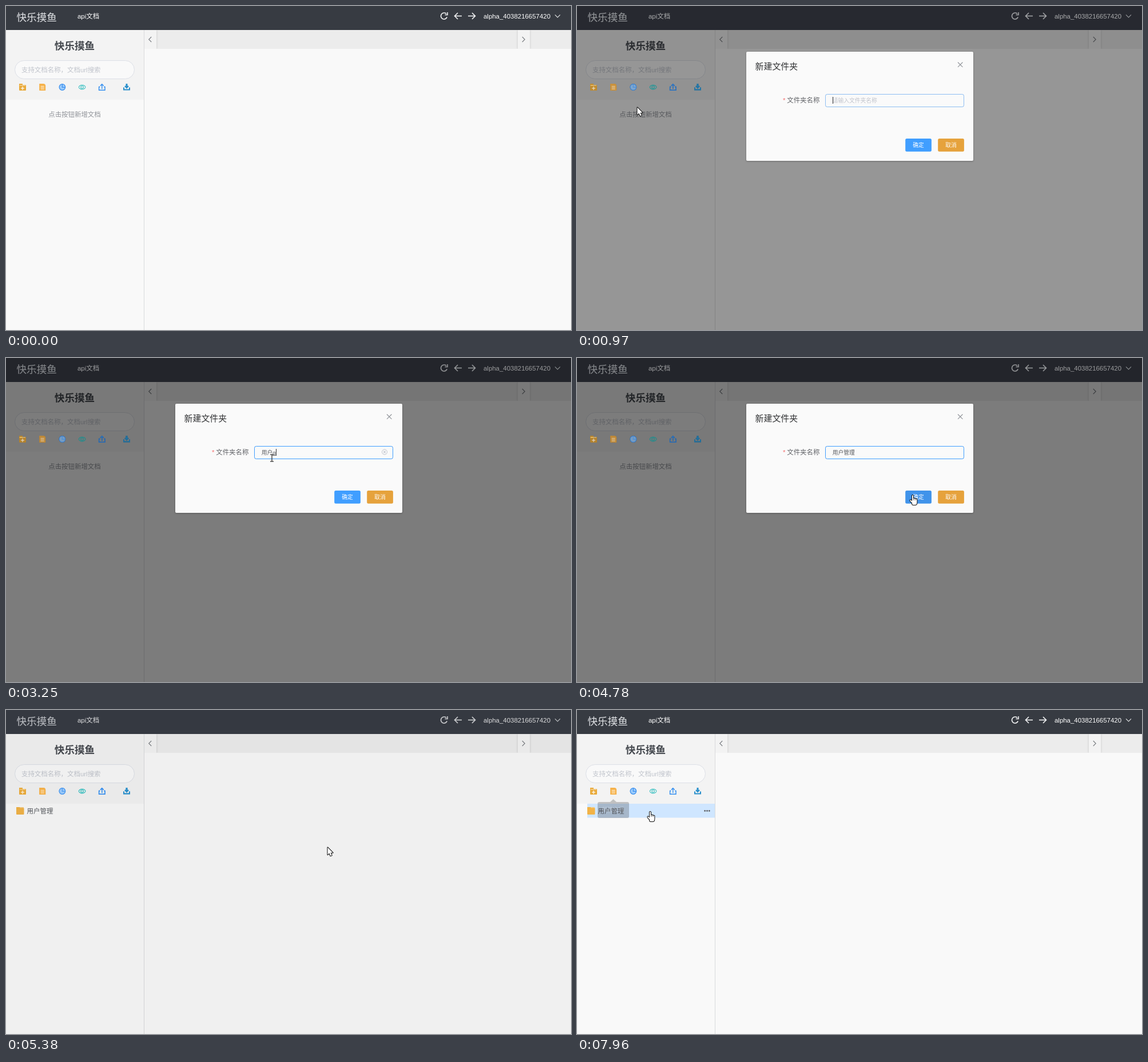
An HTML page with a canvas that plays this animation: 988 by 567 pixels, repeating every 7990 ms.

```html
<!DOCTYPE html>
<html lang="zh-CN">
<head>
<meta charset="utf-8">
<title>api文档</title>
<style>
html, body { margin: 0; width: 100%; height: 100%; overflow: hidden; background: #f9f9f9; }
canvas { display: block; }
</style>
</head>
<body>
<canvas id="stage" width="988" height="567"></canvas>
<script>
const c = document.getElementById('stage').getContext('2d');
const W = 988, H = 567, LOOP = 7990, SIDE = 241, BAR = 42;
const FONT = '"Liberation Sans", Arial, "Noto Sans CJK SC", "Noto Sans CJK", sans-serif';
const SMALL = 9.75, BODY = 11.44, LARGE = 17.6;
const BLUE = '#409eff', ORANGE = '#e6a23c', GREY = '#c0c4cc';

const ramp = (t, a, b) => Math.max(0, Math.min(1, (t - a) / (b - a)));
const inside = (p, x, y, w, h) => p.x > x && p.x < x + w && p.y > y && p.y < y + h;

// pointer moves: the path rests between them and may bow up or down
const moves = [
  { from: 100, to: 730, x: 25, y: 141, bow: -132 },
  { from: 880, to: 1600, x: 465, y: 175, bow: 50 },
  { from: 3940, to: 4000, x: 482, y: 172 },
  { from: 4120, to: 4630, x: 587, y: 239 },
  { from: 4930, to: 5380, x: 562, y: 240 },
  { from: 5380, to: 5920, x: 110, y: 177 },
  { from: 6560, to: 6830, x: 64, y: 137 },
  { from: 6830, to: 7090, x: 68, y: 176 },
  { from: 7090, to: 7330, x: 128, y: 177 }
];

function pointerAt(t) {
  let x = 868, y = 255;
  for (const m of moves) {
    const e = 1 - (1 - ramp(t, m.from, m.to)) ** 1.5;
    x += (m.x - x) * e;
    y += (m.y - y) * e + 4 * e * (1 - e) * (m.bow || 0);
  }
  return { x: Math.round(x), y: Math.round(y) };
}

function box(x, y, w, h, fill) {
  c.fillStyle = fill;
  c.fillRect(x, y, w, h);
}

function round(x, y, w, h, r, fill, stroke) {
  c.beginPath();
  c.roundRect(x, y, w, h, r);
  if (fill) { c.fillStyle = fill; c.fill(); }
  if (stroke) { c.strokeStyle = stroke; c.lineWidth = 1; c.stroke(); }
}

function text(s, x, middle, size, color, weight = 400) {
  c.font = `${weight} ${size}px ${FONT}`;
  c.fillStyle = color;
  c.fillText(s, x, middle + size * 0.37);
}

function line(color, width, ...p) {
  c.strokeStyle = color;
  c.lineWidth = width;
  c.beginPath();
  for (let i = 0; i < p.length; i += 2) c.lineTo(p[i], p[i + 1]);
  c.stroke();
}

function disc(x, y, r, fill) {
  c.fillStyle = fill;
  c.beginPath();
  c.arc(x, y, r, 0, 7);
  c.fill();
}

function ring(x, y, r, color, width, a = 0, b = 7) {
  c.strokeStyle = color;
  c.lineWidth = width;
  c.beginPath();
  c.arc(x, y, r, a, b);
  c.stroke();
}

function cross(x, y, r, color) {
  line(color, 1.1, x - r, y - r, x + r, y + r);
  line(color, 1.1, x + r, y - r, x - r, y + r);
}

// open chevron whose point faces the given angle
function chevron(x, y, r, angle, color, width) {
  c.save();
  c.translate(x, y);
  c.rotate(angle);
  line(color, width, -r / 2, -r, r / 2, 0, -r / 2, r);
  c.restore();
}

function at(x, y, alpha, paint) {
  c.save();
  c.translate(x, y);
  c.globalAlpha *= alpha;
  paint();
  c.restore();
}

function header() {
  const ink = '#f2f3f4';
  box(0, 0, W, BAR, '#373b42');
  text('快乐摸鱼', 18.5, 19, LARGE, '#e2e4e7');
  text('api文档', 125, 18, BODY, '#fff');
  text('alpha_4038216657420', 835, 18, BODY, '#fff');
  ring(766, 17.5, 5.5, ink, 1.6, 0.35, 5.5);
  line(ink, 1.6, 772, 11, 772, 15.5, 767.5, 15.5);
  for (const [x, dir] of [[791, -1], [814, 1]]) {
    line(ink, 1.6, x - 6 * dir, 17.5, x + 6 * dir, 17.5);
    line(ink, 1.6, x + dir, 12, x + 6.5 * dir, 17.5, x + dir, 23);
  }
  chevron(964.5, 17.7, 4.5, Math.PI / 2, '#dcdee0', 1.2);
}

function tabs() {
  box(SIDE + 1, BAR, W, 33, '#ececec');
  for (const [x, angle] of [[242, Math.PI], [895, 0]]) {
    c.save();
    c.beginPath();
    c.rect(SIDE + 1, BAR, W, 33);
    c.clip();
    c.shadowColor = 'rgba(0,0,0,.16)';
    c.shadowBlur = 4;
    box(x, BAR, 21, 33, '#f3f3f3');
    c.restore();
    chevron(x + 10, 58.5, 4.5, angle, '#7a7d82', 1.1);
  }
}

// each icon is drawn around its own centre
const icons = [
  () => {
    box(-6, -6, 6, 4, '#e9aa3a');
    round(-6, -4, 12, 10, 1, '#e9aa3a');
    box(-5, -3.5, 10, 1, '#fbeccd');
    line('#fff', 1.2, 0, -1, 0, 5);
    line('#fff', 1.2, -3, 2, 3, 2);
  },
  () => {
    round(-5.5, -6, 11, 12, [0, 4, 0, 0], '#f6b24b');
    for (const y of [-1.5, 0.8, 3.2]) line('#fff3dc', 1, -3, y, 3, y);
  },
  () => {
    disc(0, 0, 5.5, '#9bcbfb');
    ring(0, 0, 5.3, '#3b8fee', 1.2);
    line('#3b8fee', 1.2, 0, -5, 0, 0.3, 5, 0.3);
  },
  () => {
    ring(0, 3, 6.8, '#35bfc0', 1.1, -2.65, -0.49);
    ring(0, -3, 6.8, '#35bfc0', 1.1, 0.49, 2.65);
    ring(0, 0, 2.2, '#35bfc0', 1.1);
  },
  () => {
    line('#2f8cf0', 1.4, -3.4, -0.5, -5.2, -0.5, -5.2, 5.3, 5.2, 5.3, 5.2, -0.5, 3.4, -0.5);
    line('#2f8cf0', 1.4, 0, 3, 0, -5);
    chevron(0, -3.7, 3, -Math.PI / 2, '#2f8cf0', 1.4);
  },
  () => {
    line('#2a90cc', 3, 0, -6, 0, -1);
    chevron(0, -0.5, 3, Math.PI / 2, '#2a90cc', 2.4);
    line('#2a90cc', 2, -5, 0.5, -5, 4.5, 5, 4.5, 5, 0.5);
  }
];
const iconX = i => 29 + 34.7 * i + (i === 5 ? 8.5 : 0);

function toolbar() {
  icons.forEach((paint, i) => at(iconX(i), 142, 1, paint));
}

const onRow = p => inside(p, -1, 163, SIDE, 25);
const onOk = p => inside(p, 574, 232, 46, 23);
const onInput = p => inside(p, 434, 154, 243, 23);
const onTool = p => icons.some((_, i) => inside(p, iconX(i) - 8, 135, 16, 14));

function sidebar(t, p, tree) {
  box(0, BAR, SIDE, 122, '#f3f3f3');
  text('快乐摸鱼', 84.8, 69.5, LARGE, '#45494f', 700);
  round(15.5, 95.5, 209, 32, 16, '#f9f9f9', '#dcdfe6');
  text('支持文档名称，文档url搜索', 27, 111.5, BODY, GREY);
  toolbar();
  if (tree) {
    const picked = t >= 7600;
    if (picked || onRow(p)) box(18, 164, SIDE - 18, 24.5, picked ? '#cfe6ff' : '#f5f8fc');
    box(18, 170, 13, 2, '#f6cd85');
    box(18, 170, 6, 4, '#efb041');
    round(18, 171.5, 13.5, 11.5, 1, '#f2b347');
    text('用户管理', 36.6, 177, BODY, '#55585d');
    if (picked) for (let i = -1; i < 2; i++) disc(227.5 + 3.8 * i, 176.5, 1.4, '#606266');
  } else {
    text('点击按钮新增文档', 74.2, 189.5, BODY, '#909399');
  }
  box(SIDE, BAR, 1, H, '#d9dadc');
}

// pinyin still being composed
function composing(t) {
  if (t >= 2440 && t < 3070)
    return "yong'hu".slice(0, 1 + Math.floor(3 * ramp(t, 2440, 2590)) + Math.ceil(3 * ramp(t, 2860, 3040)));
  if (t >= 3250 && t < 3700)
    return "guan'li".slice(0, 1 + Math.floor(6 * ramp(t, 3250, 3640)));
  return '';
}

function candidates(t) {
  const first = t >= 2470 && t < 3070;
  if (!first && !(t >= 3280 && t < 3730)) return;
  const x = first ? 444 : 464;
  const w = first ? (t < 2890 ? 379 : 476) : 508;
  const words = (first ? '用户 拥护 用乎 用 有' : '管理 管 官 关 惯例 馆').split(' ');
  box(x, 178, w, 32, '#2f3135');
  box(x, 178, 63, 32, '#fefefe');
  words.forEach((s, i) => {
    text(`${i + 1} ${s}`, x + 10 + i * (w - 40) / words.length, 194, 13, i ? '#fff' : '#303133');
  });
  if (!first) {
    round(x + 0.5, 209.5, 229, 21, 0, '#2f3135', '#fff');
    text('点击翻页可查看更多候选词', x + 7, 220.5, 10.5, '#fff');
  }
}

function field(t) {
  const focus = ramp(t, 880, 1060) * (1 - ramp(t, 4900, 4960));
  round(434.5, 154.5, 242, 22, 3, '#fafafa', '#dcdfe6');
  at(0, 0, focus, () => round(434.5, 154.5, 242, 22, 3, null, BLUE));

  const done = t < 3070 ? '' : t < 3700 ? '用户' : '用户管理';
  const raw = composing(t);
  const left = 446.7;
  const shown = done + raw;
  text(shown || '请输入文件夹名称', left, 165, SMALL, shown ? '#55585d' : GREY);
  const end = left + (shown ? c.measureText(shown).width : 0);
  const tail = c.measureText(raw).width;
  box(end - tail, 170, tail, 1, '#606266');
  if (shown && t < 4720) {
    ring(662, 164.5, 4.5, GREY, 1);
    cross(662, 164.5, 1.8, GREY);
  }
  if (t < 1420 || (t >= 1900 && t < 4180)) box(Math.round(end), 159, 1, 12, '#303133');
}

function button(label, x, fill) {
  round(x, 232, 45.7, 22.7, 2.5, fill);
  text(label, x + 13, 243.3, SMALL, '#fff', 500);
}

function dialog(t, p) {
  c.save();
  c.shadowColor = 'rgba(0,0,0,.3)';
  c.shadowBlur = 3;
  c.shadowOffsetY = 1;
  round(296, 80, 397, 191, 2, '#fafafa');
  c.restore();
  text('新建文件夹', 311.6, 105, 14.9, '#303133');
  cross(670.2, 102.7, 4.2, '#909399');
  text('*', 360, 165, BODY, '#f56c6c');
  text('文件夹名称', 367.2, 164.5, BODY, '#606266');
  field(t);
  const pressed = t >= 4720 && t < 4870;
  button('确定', 574.2, !onOk(p) ? BLUE : pressed ? '#4093ea' : '#66b1ff');
  button('取消', 631.2, ORANGE);
  candidates(t);
}

function tooltip() {
  round(36, 161, 55, 28, 3, '#303133');
  c.beginPath();
  c.moveTo(58, 161);
  c.lineTo(63.5, 156);
  c.lineTo(69, 161);
  c.fill();
  text('新建文档', 43.5, 174.5, SMALL, '#fff');
}

const ARROW = new Path2D('M.5 .5V13.2L3.4 10.5L5.4 15.3L7.7 14.4L5.7 9.7H9.6Z');

function outlined(shape) {
  c.lineWidth = 2;
  c.lineJoin = 'round';
  c.strokeStyle = '#111';
  c.stroke(shape);
  c.fillStyle = '#fff';
  c.fill(shape);
}

const pointers = {
  arrow() { outlined(ARROW); },
  hand() {
    const hand = new Path2D();
    hand.roundRect(-1, 1, 2, 13, 1);
    for (let i = 0; i < 3; i++) hand.roundRect(1.6 + 2.1 * i, 6.5 + 0.6 * i, 1.6, 7, 0.8);
    hand.ellipse(-2.4, 11.8, 1.2, 3, -0.7, 0, 7);
    hand.roundRect(-1, 10, 8.2, 8, [0, 0, 3, 2]);
    outlined(hand);
  },
  beam() {
    line('#222', 1.2, 0, -5.5, 0, 5.5);
    for (const y of [-6, 6]) line('#222', 1.2, -3, y, 3, y);
  }
};

function draw(t) {
  const p = pointerAt(t);
  const tree = t >= 5150;
  const shade = t < 910 ? 0 : Math.min(ramp(t, 850, 1000), 1 - ramp(t, 5200, 5394));
  const open = t < 910 ? 0 : Math.min(ramp(t, 880, 970), 1 - ramp(t, 5180, 5330));

  box(0, 0, W, H, '#f9f9f9');
  header();
  tabs();
  sidebar(t, p, tree);
  if (shade) {
    box(0, 0, W, H, `rgba(0,0,0,${shade / 2})`);
    // header and icons keep more of their light
    at(0, 0, 0.3, header);
    at(0, 0, 0.55, toolbar);
  }
  if (open) at(0, 20 * (open - 1), open, () => dialog(t, p));
  if (t >= 7840) at(0, 0, 0.26 * ramp(t, 7810, 7960), tooltip);

  if (t < 100) return;
  let kind = 'arrow';
  if (open && onInput(p)) kind = 'beam';
  else if (open ? onOk(p) : onTool(p) || (tree && onRow(p))) kind = 'hand';
  at(p.x, p.y, 1, pointers[kind]);
}

const start = performance.now();
function tick() {
  const t = (performance.now() - start) % LOOP;
  draw(Math.max(0, Math.floor((t - 10) / 30) * 30 + 10));
  requestAnimationFrame(tick);
}
tick();
</script>
</body>
</html>
```
